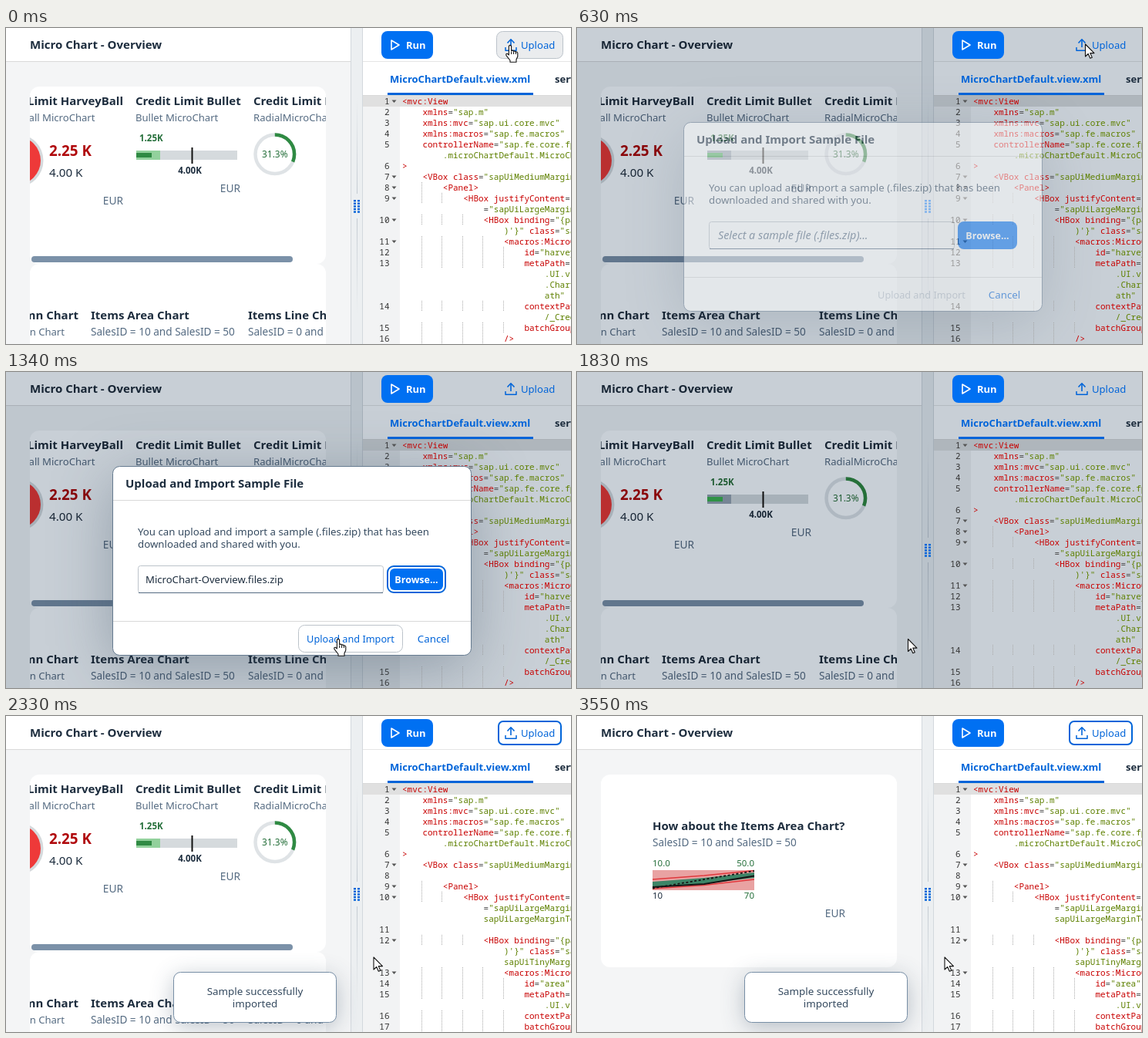
Recreate the animation shown at these times as an HTML page with a canvas. Size 733 px wide and 410 px high, loop 4.64 s.

```html
<!DOCTYPE html>
<html lang="en">
<head>
<meta charset="utf-8">
<title>Micro Chart - Overview</title>
<style>
html, body { margin: 0; width: 100%; height: 100%; overflow: hidden; background: #fff; }
canvas { display: block; }
</style>
</head>
<body>
<canvas id="stage" width="733" height="410"></canvas>
<script>
const W = 733, H = 410, LOOP = 4640;
const SANS = '"Noto Sans", "Open Sans", sans-serif';
const MONO = '"Noto Sans Mono", "DejaVu Sans Mono", monospace';
const INK = '#1d2d3e', SOFT = '#556b82', BLUE = '#0064d9', FILL = '#0070f2';
const GREEN = '#256f3a', RED = '#b0080c', LINE = '#d9d9d9', TRACK = '#d5dadd';
const SHADE = '#c8cfd6';

const stage = document.getElementById('stage').getContext('2d');
const layer = document.createElement('canvas');
layer.width = W;
layer.height = H;
const overlay = layer.getContext('2d');
let c = stage;

function box(x, y, w, h, color) {
  c.fillStyle = color;
  c.fillRect(x, y, w, h);
}

function round(x, y, w, h, r, fill, stroke, width = 1) {
  c.beginPath();
  c.roundRect(x, y, w, h, r);
  if (fill) { c.fillStyle = fill; c.fill(); }
  if (stroke) { c.strokeStyle = stroke; c.lineWidth = width; c.stroke(); }
}

function text(s, x, y, size, color, weight = 400, align = 'left') {
  c.font = `${weight} ${size}px ${SANS}`;
  c.textAlign = align;
  c.fillStyle = color;
  c.fillText(s, x, y);
}

const head = (s, x, y, align) => text(s, x, y, 15, INK, 700, align);
const note = (s, x, y, align, size = 13.1) => text(s, x, y, size, SOFT, 400, align);

function path(points, color, width, dash = []) {
  c.beginPath();
  points.forEach(([x, y]) => c.lineTo(x, y));
  c.strokeStyle = color;
  c.lineWidth = width;
  c.setLineDash(dash);
  c.stroke();
  c.setLineDash([]);
}

function poly(points, color) {
  c.beginPath();
  points.forEach(([x, y]) => c.lineTo(x, y));
  c.closePath();
  c.fillStyle = color;
  c.fill();
}

function disc(x, y, r, color) {
  c.beginPath();
  c.arc(x, y, r, 0, Math.PI * 2);
  c.fillStyle = color;
  c.fill();
}

function arc(x, y, r, part, color, width) {
  c.beginPath();
  c.arc(x, y, r, -Math.PI / 2, Math.PI * (2 * part - 0.5));
  c.strokeStyle = color;
  c.lineWidth = width;
  c.stroke();
}

function shadow(color, blur, dy) {
  c.shadowColor = color;
  c.shadowBlur = blur;
  c.shadowOffsetY = dy;
}

// Code rows: line number ("+" marks a fold), indent level, text
const START = [
  ['1+', 0, '<mvc:View'],
  ['2', 1, 'xmlns="sap.m"'],
  ['3', 1, 'xmlns:mvc="sap.ui.core.mvc"'],
  ['4', 1, 'xmlns:macros="sap.fe.macros"'],
  ['5', 1, 'controllerName="sap.fe.core.fpmExplorer'],
  ['', 2, '.microChartDefault.MicroChartDefault"'],
  ['6', 0, '>'],
  ['7+', 1, '<VBox class="sapUiMediumMargin">']
];
const BEFORE = START.concat([
  ['8+', 2, '<Panel>'],
  ['9+', 3, '<HBox justifyContent="Start" class'],
  ['', 4, '="sapUiLargeMarginBegin">'],
  ['10+', 4, '<HBox binding="{path: \'/'],
  ['', 5, ')\'}" class="sapUiTinyMargin">'],
  ['11+', 5, '<macros:MicroChart'],
  ['12', 6, 'id="harvey"'],
  ['13', 6, 'metaPath="@com.sap'],
  ['', 7, '.UI.v1'],
  ['', 7, '.Chart#p'],
  ['', 7, 'ath"'],
  ['14', 6, 'contextPath="'],
  ['', 7, '/_Credit"'],
  ['15', 6, 'batchGroupId="x"'],
  ['16', 5, '/>']
]);
const AFTER = START.concat([
  ['8', 0, ''],
  ['9+', 2, '<Panel>'],
  ['10+', 3, '<HBox justifyContent="Start" class'],
  ['', 4, '="sapUiLargeMarginBegin'],
  ['', 4, 'sapUiLargeMarginTop">'],
  ['11', 0, ''],
  ['12+', 4, '<HBox binding="{path: \'/'],
  ['', 5, ')\'}" class="sapUiTinyMargin'],
  ['', 5, 'sapUiTinyMarginTop">'],
  ['13+', 5, '<macros:MicroChart'],
  ['14', 6, 'id="area"'],
  ['15', 6, 'metaPath="@com.sap'],
  ['', 7, '.UI.v1.Chart"'],
  ['16', 6, 'contextPath="/"'],
  ['17', 6, 'batchGroupId="x"']
]);

function code(rows) {
  const step = 6.6;
  let quoted = false;
  rows.forEach(([label, indent, line], i) => {
    const mid = 95 + i * 14, num = parseInt(label);
    c.font = `11px ${MONO}`;
    if (num) {
      c.textAlign = 'right';
      c.fillStyle = '#333';
      c.fillText(num, 497.5, mid + 4);
      for (let k = 1; k < indent; k++) {
        const x = Math.round(513.5 + k * 4 * step) - 0.5;
        path([[x, mid - 7], [x, mid + 7]], '#aaa', 1, [1, 1]);
      }
    }
    if (label.endsWith('+')) poly([[500.5, mid - 1.5], [506.5, mid - 1.5], [503.5, mid + 2]], '#555');
    c.textAlign = 'left';
    [...line].forEach((ch, n) => {
      const mark = ch === '"';
      c.fillStyle = quoted || mark ? '#5e8000' : ch === '=' ? '#444' : '#c80000';
      if (mark) quoted = !quoted;
      c.fillText(ch, 514 + (indent * 4 + n) * step, mid + 4);
    });
  });
}

function uploadButton(mode, iconColor) {
  if (mode === 'hover') round(636.5, 4.5, 86, 35, 8, '#eaecee', '#bcc3ca');
  if (mode === 'focus') round(639, 7, 81, 30, 6, '#fff', BLUE, 2);
  const col = iconColor || BLUE;
  path([[655, 25], [655, 15]], col, 1.6);
  path([[650.5, 19.5], [655, 14.8], [659.5, 19.5]], col, 1.6);
  path([[648, 25], [648, 29.2], [662, 29.2], [662, 25]], col, 1.5);
  text('Upload', 668, 27, 13.1, BLUE, 500);
}

function editorBack() {
  box(463, 0, 270, 410, '#fff');
  box(463, 43, 270, 1, '#e5e5e5');
  box(463, 87, 270, 1, LINE);
  box(463, 88, 48, 322, '#f2f3f4');
  box(463, 88, 270, 14, '#e0e0e0');
}

function editor(s) {
  round(487, 4, 67, 36, 8, FILL);
  c.lineJoin = 'round';
  c.beginPath();
  c.moveTo(500, 16);
  c.lineTo(510, 22);
  c.lineTo(500, 28);
  c.closePath();
  c.strokeStyle = '#fff';
  c.lineWidth = 1.6;
  c.stroke();
  text('Run', 519, 27, 13, '#fff', 700);
  uploadButton(s.button, s.icon);
  text('MicroChartDefault.view.xml', 498, 71, 13, BLUE, 700);
  text('service.cds', 712, 71, 13, INK, 600);
  code(s.fresh ? AFTER : BEFORE);
  box(495, 84, 189, 3, BLUE);
}

function splitter() {
  box(447, 0, 16, 410, '#eceff1');
  box(447, 0, 1, 410, '#d3d8dd');
  box(462, 0, 1, 410, '#d3d8dd');
  for (const [from, to] of [[215, 90], [247, 372]]) {
    const g = c.createLinearGradient(0, from, 0, to);
    g.addColorStop(0, '#c3cad1');
    g.addColorStop(1, '#eceff1');
    box(455, Math.min(from, to), 1, 125, g);
  }
}

function grip() {
  for (let i = 0; i < 10; i++) box(451 + i % 2 * 5, 223 + (i >> 1) * 3.6, 3, 2.4, BLUE);
}

function harvey() {
  head('Credit Limit HarveyBall', 152, 100, 'right');
  note('HarveyBall MicroChart', 115.5, 121, 'right');
  disc(14, 172, 34.5, TRACK);
  disc(14, 172, 31, '#ee3939');
  text('2.25 K', 56, 165.5, 18.8, RED, 700);
  text('4.00 K', 56, 192.5, 15.2, INK);
  note('EUR', 152, 229, 'right', 13.7);
}

function bullet(dimmed) {
  head('Credit Limit Bullet', 168, 100);
  note('Bullet MicroChart', 168, 121);
  text('1.25K', 173, 147, 11.5, GREEN, 700);
  box(169, 159, 131, 12, TRACK);
  box(169, 159, 31, 12, dimmed ? '#96a4b2' : '#92d19c');
  box(169, 162, 20, 6, dimmed ? '#3cb453' : '#2f8a43');
  box(240.5, 155, 2, 21, '#111');
  text('4.00K', 238.5, 189, 11.5, INK, 700, 'center');
  note('EUR', 304, 213, 'right', 13.7);
}

function radial() {
  head('Credit Limit Radial', 321, 100);
  note('RadialMicroChart', 321, 121);
  arc(348.8, 163.8, 25.3, 1, '#dfe3e6', 4.5);
  arc(348.8, 163.8, 25.3, 0.313, '#2f8a43', 4.5);
  text('31.3%', 348.8, 168, 11.9, GREEN, 400, 'center');
}

function charts(dimmed) {
  round(31, 76, 384, 230, 12, '#fff');
  round(31, 306, 384, 130, 12, '#fff');
  c.save();
  c.beginPath();
  c.rect(31, 76, 384, 334);
  c.clip();
  harvey();
  bullet(dimmed);
  radial();
  head('Items Column Chart', 94, 378, 'right');
  note('Column Chart', 76, 399, 'right');
  head('Items Area Chart', 110, 378);
  note('SalesID = 10 and SalesID = 50', 110, 399, 'left', 13.6);
  head('Items Line Chart', 314, 378);
  note('SalesID = 0 and SalesID = 10', 314, 399, 'left', 13.6);
  c.restore();
  round(33, 296, 339, 8, 4, '#7b91a8');
}

function areaChart(full) {
  round(31, 76, 384, 250, 12, '#fff');
  head('How about the Items Area Chart?', 98, 148);
  note('SalesID = 10 and SalesID = 50', 98, 169, 'left', 13.6);
  if (!full) return;
  text('10.0', 98, 195, 11.5, GREEN);
  text('50.0', 230, 195, 11.5, GREEN, 400, 'right');
  box(98, 200, 132, 26, '#e9a2a2');
  const top = [[98, 212], [165, 207], [230, 200.5]];
  const low = [[98, 224], [165, 219.5], [230, 212]];
  poly([[98, 215], [165, 210], [230, 203], [230, 210], [165, 217.5], [98, 222.5]], '#3d8567');
  path(top, '#e0383c', 1.7);
  path(low, '#e0383c', 1.7);
  path([[98, 222], [165, 218], [230, 207.5]], '#151515', 2);
  path([[98, 223.5], [165, 212], [230, 201]], '#151515', 1.8, [3, 2.5]);
  text('10', 98, 237, 11.5, INK);
  text('70', 230, 237, 11.5, GREEN, 400, 'right');
  note('EUR', 348, 261, 'right', 13.7);
}

function page(s) {
  box(0, 0, 447, 410, '#f4f5f6');
  box(0, 0, 447, 43, '#fff');
  box(0, 43, 447, 1, LINE);
  head('Micro Chart - Overview', 31, 27);
  if (s.area) areaChart(s.area > 1);
  else charts(s.dim);
}

function dialog(s) {
  c.save();
  shadow('rgba(60,80,100,.4)', 80, 16);
  round(139, 123, 464, 244, 9, '#fff');
  c.restore();
  round(138.5, 122.5, 465, 245, 9, '#fff', '#667b90');
  box(139, 166, 464, 1, LINE);
  box(139, 323, 464, 1, LINE);
  head('Upload and Import Sample File', 155, 150);
  text('You can upload and import a sample (.files.zip) that has been', 171, 212, 13.25, '#354a5f');
  text('downloaded and shared with you.', 171, 228, 13.25, '#354a5f');
  round(171.5, 251.5, 318, 35, 3, '#fff', '#bcc3ca');
  box(172, 286, 317, 1, SOFT);
  if (s.chosen) {
    text('MicroChart-Overview.files.zip', 181, 274, 13.1, INK);
    round(495, 252, 75, 34, 8, '#fff', BLUE, 2);
    round(498, 255, 69, 28, 6, FILL);
  } else {
    text('Select a sample file (.files.zip)...', 183, 274, 14.3, SOFT, 'italic 400');
    round(494, 251, 77, 36, 8, FILL);
  }
  text('Browse...', 532.5, 273.5, 12.5, '#fff', 700, 'center');
  if (s.over) round(379.5, 328.5, 135, 35, 8, '#fff', '#bcc3ca');
  c.globalAlpha = s.chosen ? 1 : 0.4;
  text('Upload and Import', 447, 351, 12.7, s.chosen ? BLUE : SOFT, 500, 'center');
  c.globalAlpha = 1;
  text('Cancel', 554.5, 351, 13.3, BLUE, 500, 'center');
}

function toast() {
  c.save();
  shadow('rgba(60,80,100,.35)', 30, 6);
  round(217.5, 332.5, 211, 65, 9, '#fff');
  c.restore();
  round(217.5, 332.5, 211, 65, 9, '#fff', '#788fa6');
  text('Sample successfully', 323, 362, 13.4, '#354a5f', 400, 'center');
  text('imported', 323, 378, 13.4, '#354a5f', 400, 'center');
}

const SHAPES = {
  hand: new Path2D('M-1.6 1.6Q0 -.8 1.6 1.6V7.6Q3.2 6.4 4.6 8.2Q6.2 7.2 7.4 9.1Q9.4 8.4 9.8 10.6V15L8 19V22.3H0V20L-5 13.6Q-5.8 10.8 -3.4 11.4L-1.6 13Z'),
  arrow: new Path2D('M.5 .5V16.5L4.2 13L6.8 18.8L9.3 17.7L6.8 12.1H12Z')
};

function cursor([, kind, x, y]) {
  if (!kind) return;
  c.save();
  c.translate(x, y);
  c.lineJoin = 'round';
  c.fillStyle = '#fff';
  c.strokeStyle = '#111';
  c.lineWidth = 1.1;
  c.fill(SHAPES[kind]);
  c.stroke(SHAPES[kind]);
  if (kind === 'hand') for (const k of [1.6, 4.6, 7.4]) path([[k, 8.5], [k, 12]], '#111', 1);
  c.restore();
}

const POINTER = [
  [0, 'hand', 654, 22],
  [330, 'hand', 657, 21],
  [440, 'hand', 660, 20],
  [630, 'arrow', 659, 20.5],
  [740, ''],
  [910, 'arrow', 478, 307],
  [1020, 'arrow', 461, 319],
  [1130, 'hand', 446, 332],
  [1230, 'hand', 437, 341],
  [1340, 'hand', 431, 346],
  [1730, 'arrow', 429, 346],
  [2330, 'arrow', 476.5, 312.5]
];

function stateAt(t) {
  return {
    button: t < 440 ? 'hover' : t < 630 || t >= 2130 ? 'focus' : 'plain',
    icon: t >= 550 && t < 630 ? '#8fab55' : '',
    dim: t >= 630 && t < 2130,
    dialog: t < 630 || t >= 1830 ? 0 : t < 740 ? 0.5 : t < 1730 ? 1 : 0.45,
    chosen: t >= 740,
    over: t >= 1130,
    fresh: t >= 2330,
    area: t < 3450 ? 0 : t < 3550 ? 1 : 2,
    pointer: POINTER.filter(p => p[0] <= t).pop()
  };
}

function draw(t) {
  const s = stateAt(t);
  c = stage;
  page(s);
  editorBack();
  splitter();
  // The shade keeps dark text and bright accents strong
  if (s.dim) {
    c.globalCompositeOperation = 'multiply';
    box(0, 0, W, H, SHADE);
    c.globalCompositeOperation = 'source-over';
  }
  editor(s);
  grip();
  if (s.dialog) {
    c = overlay;
    c.clearRect(0, 0, W, H);
    dialog(s);
    c = stage;
    c.globalAlpha = s.dialog;
    c.drawImage(layer, 0, 0);
    c.globalAlpha = 1;
  }
  if (s.fresh) toast();
  cursor(s.pointer);
}

const begin = performance.now();
function tick() {
  draw((performance.now() - begin) % LOOP);
  requestAnimationFrame(tick);
}
tick();
</script>
</body>
</html>
```
